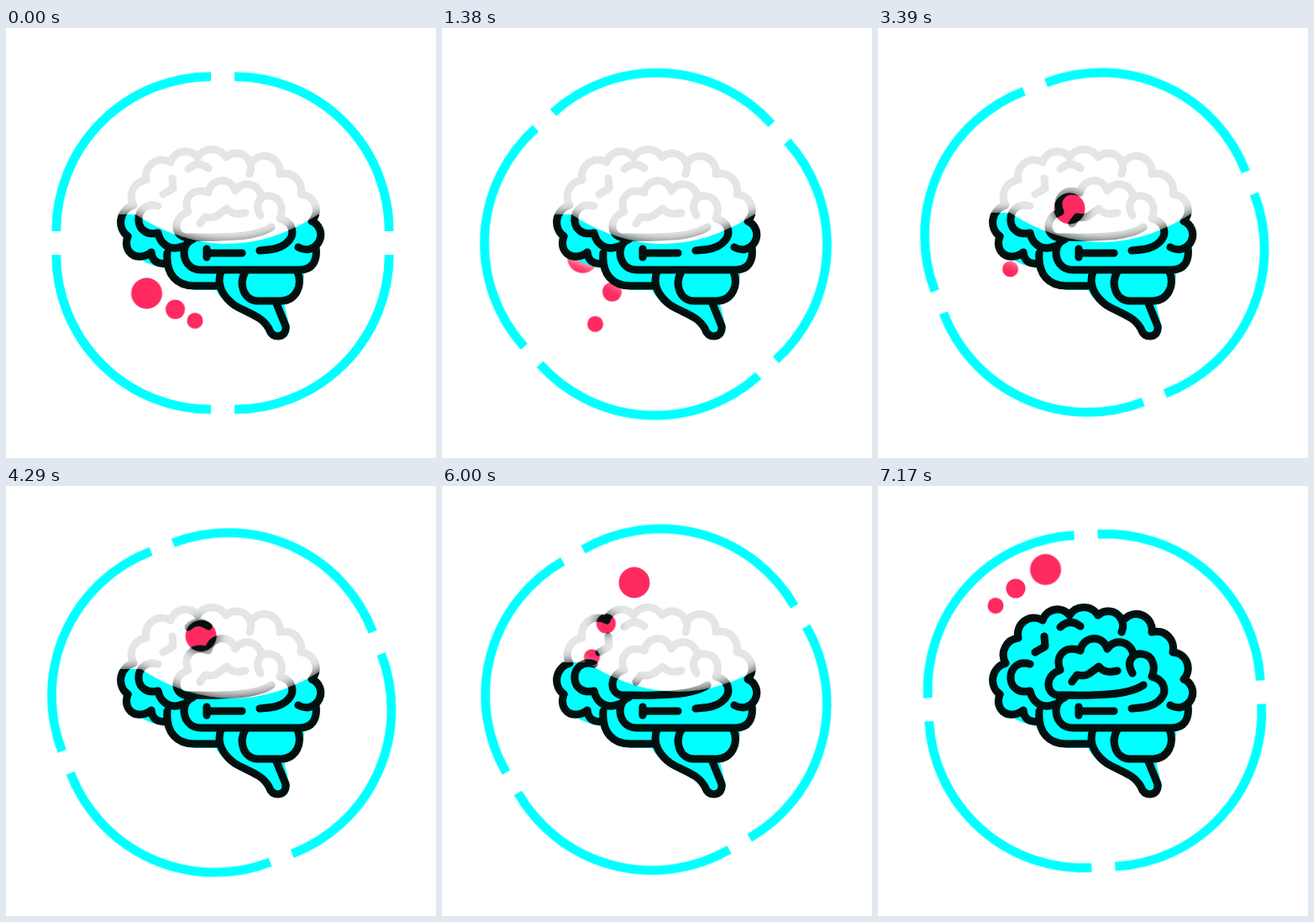
Animation of 512 by 512 pixels, one loop 7260 ms. Source, as an HTML page:

```html
<!DOCTYPE html>
<html lang="en">
<head>
<meta charset="utf-8">
<title>Brain</title>
<style>
  html, body { margin: 0; width: 100%; height: 100%; overflow: hidden; background: #fff; }
  svg { display: block; width: 100%; height: 100%; }
  .ring, .big, .mid, .small, .veil { animation: 7260ms linear infinite; }

  .ring { transform-origin: 256px 256px; animation-name: spin; }
  @keyframes spin {
    0% { transform: rotate(0deg); animation-timing-function: steps(239); }
    98.76%, 100% { transform: rotate(717deg); }
  }

  .big { animation-name: big; }
  @keyframes big {
    0% { transform: translate(167.5px, 316px); }
    19% { transform: translate(167.5px, 273.5px); }
    31.4% { transform: translate(222px, 232px); }
    46.7% { transform: translate(228px, 215px); }
    71.1% { transform: translate(236px, 143px); }
    82.6% { transform: translate(229px, 115px); }
    98.76%, 100% { transform: translate(199.5px, 99.5px); }
  }

  .mid { animation-name: mid; }
  @keyframes mid {
    0% { transform: translate(201.5px, 335px); }
    19% { transform: translate(202.5px, 314px); }
    31.4% { transform: translate(204px, 338px); }
    46.7% { transform: translate(213px, 284px); }
    71.1% { transform: translate(205px, 262px); }
    82.6% { transform: translate(195.5px, 164px); }
    98.76%, 100% { transform: translate(164px, 122px); }
  }

  .small { animation-name: small; }
  @keyframes small {
    0% { transform: translate(225px, 348.5px); }
    19% { transform: translate(182.5px, 352.5px); }
    31.4% { transform: translate(174.5px, 329.5px); }
    46.7% { transform: translate(157.5px, 287px); }
    71.1% { transform: translate(187px, 221px); }
    82.6% { transform: translate(178.5px, 204px); }
    98.76%, 100% { transform: translate(140px, 142.5px); }
  }

  /* the pale area that slides off the brain */
  .veil { animation-name: veil; }
  @keyframes veil {
    0%, 31.4% { transform: translate(0, 0); }
    46.7% { transform: translate(3px, -2px); }
    71.1% { transform: translate(10px, -6px); }
    82.6% { transform: translate(18px, -12px); animation-timing-function: ease-in; }
    98.76%, 100% { transform: translate(50px, -145px); }
  }
</style>
</head>
<body>
<svg viewBox="0 0 512 512">
  <defs>
    <filter id="soft" filterUnits="userSpaceOnUse" x="0" y="0" width="512" height="512" color-interpolation-filters="sRGB">
      <feGaussianBlur stdDeviation="7"/>
    </filter>
    <filter id="glow" filterUnits="userSpaceOnUse" x="0" y="0" width="512" height="512" color-interpolation-filters="sRGB">
      <feGaussianBlur stdDeviation="7"/>
      <feMerge><feMergeNode/><feMergeNode in="SourceGraphic"/></feMerge>
    </filter>

    <path id="arc" d="M14 -198.2 A184.2 184.2 0 0 1 198.2 -14"/>

    <path id="body" d="M143 249 A21 21 0 0 1 151 210 A20 20 0 0 1 166 180 A19 19 0 0 1 196 158
      A18 18 0 0 1 228 152 A20 20 0 0 1 262 152 A18 18 0 0 1 293 156 L311 154 L327 169
      Q350 172 352 196 Q374 205 367 230 Q384 244 371 265 Q372 282 355 291
      Q354 322 331 328 L338 357 Q336 370 324 371 Q314 371 309 358 L297 345
      Q261 333 250 312 H226 Q207 309 189 286 Q170 282 161 276 Q137 272 143 249 Z"/>

    <g id="lines" fill="none" stroke-width="9.1" stroke-linecap="round" stroke-linejoin="round">
      <!-- upper rim -->
      <path d="M145 248 A21 21 0 0 1 152 211 A20 20 0 0 1 167 181 A19.3 19.3 0 0 1 196 160
        A18.3 18.3 0 0 1 228 154 A20 20 0 0 1 262 154 A17.5 17.5 0 0 1 290 174"/>
      <path d="M294 158 A18.8 18.8 0 0 1 326 174 A20 20 0 0 1 351 198 A19 19 0 0 1 364 230
        A17.5 17.5 0 1 1 348 261"/>
      <!-- left and lower lobes -->
      <path d="M145 248 C140 262 148 273 161 272 Q169 271 173 267 C174 278 182 282 191 280"/>
      <path d="M181 212 C168 208 157 216 158 230 C159 241 169 247 181 244 C184 258 196 266 210 260"/>
      <path d="M192 268 C190 294 204 307 224 307 H252"/>
      <path d="M369 262 C371 278 364 288 350 288 H232 C218 288 212 277 212 267 Q213 255 222 252"/>
      <!-- middle folds -->
      <path d="M316 237 C295 252 240 249 213 249 C200 246 198 226 217 219 C210 203 222 189 241 196
        A16.3 16.3 0 0 1 273 194 A16.7 16.7 0 0 1 304 203"/>
      <path d="M303 223 C295 210 302 199 314 200 C328 201 331 216 326 227 C341 230 345 245 336 254 C328 263 316 264 302 265"/>
      <path d="M231 233 L237 225 Q247 227 252 223 L263 215 Q270 224 285 220"/>
      <path d="M217 168 Q229 157 241 167 M198 179 L199 191 L187 198"/>
      <path d="M239 263 V273 M240 268 H281"/>
      <!-- cerebellum and stem -->
      <path d="M285 290 C276 306 284 325 300 325 H328 C345 324 354 307 347 290"/>
      <path d="M256 290 C250 306 259 320 272 330 C288 340 304 342 313 358 Q316 367 324 367 Q334 366 333 355 L322 328"/>
    </g>

    <mask id="low" maskUnits="userSpaceOnUse" x="0" y="0" width="512" height="512">
      <rect width="512" height="512" fill="#fff"/>
      <path class="veil" d="M-100 -100 H600 V222 H372 Q263 292 154 222 H-100 Z"/>
    </mask>

    <mask id="ink" maskUnits="userSpaceOnUse" x="0" y="0" width="512" height="512">
      <g fill="#fff" filter="url(#glow)">
        <rect width="512" height="512" mask="url(#low)"/>
        <circle class="big" r="18.5"/>
        <circle class="mid" r="11.5"/>
        <circle class="small" r="9.5"/>
      </g>
    </mask>
  </defs>

  <g class="ring">
    <g transform="translate(258 256)" fill="none" stroke="#0ff" stroke-width="10.8">
      <use href="#arc"/>
      <use href="#arc" transform="rotate(90)"/>
      <use href="#arc" transform="rotate(180)"/>
      <use href="#arc" transform="rotate(270)"/>
    </g>
  </g>

  <g fill="#ff2a60">
    <circle class="big" r="18.5"/>
    <circle class="mid" r="11.5"/>
    <circle class="small" r="9.5"/>
  </g>
  <g filter="url(#soft)"><use href="#body" fill="#fff" mask="url(#low)"/></g>
  <use href="#body" fill="#0ff" mask="url(#low)"/>
  <g opacity=".1"><use href="#lines" stroke="#000"/></g>
  <g mask="url(#ink)"><use href="#lines" stroke="#021110"/></g>
</svg>
</body>
</html>
```
